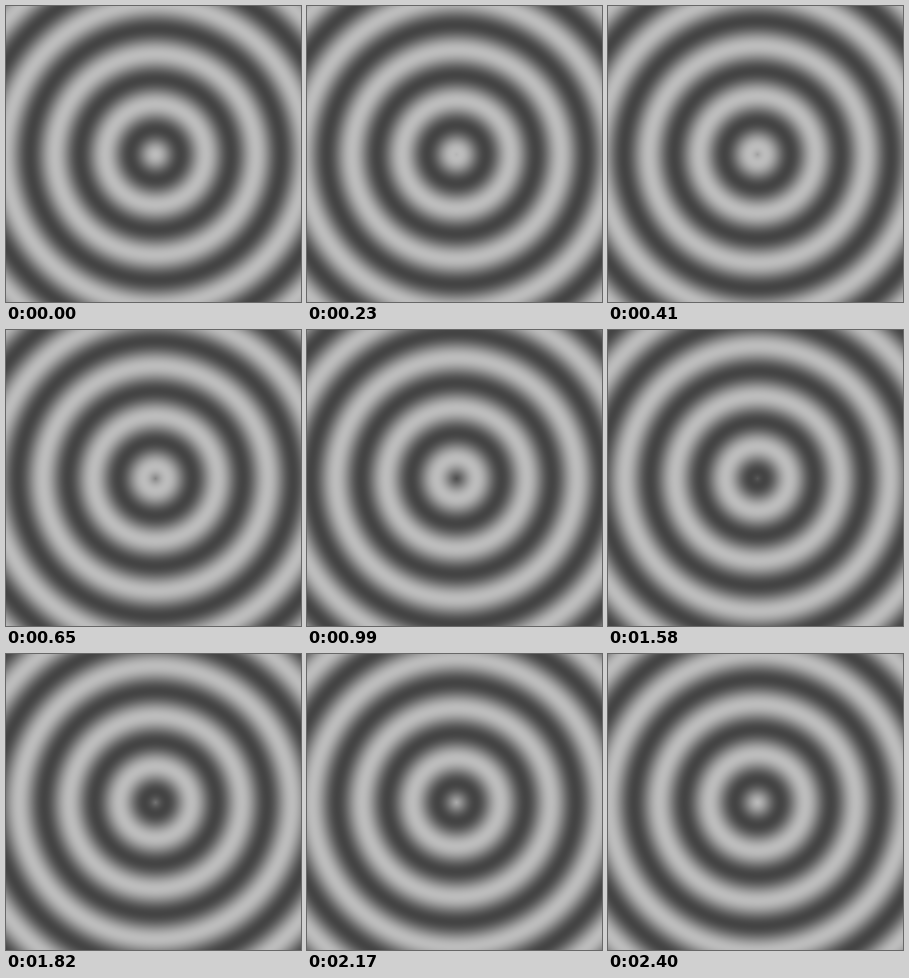
Write an HTML page with a canvas that moves like this. It is 295 px wide and 296 px high and loops after 2.46 s.

```html
<!DOCTYPE html>
<html lang="en">
<head>
<meta charset="utf-8">
<title>Ripples</title>
<style>
  html, body { margin: 0; overflow: hidden; }
  canvas { display: block; }
</style>
</head>
<body>
<canvas id="stage" width="295" height="296"></canvas>
<script>
const LOOP = 2460, TICK = 10;
const STEP_STARTS = [0, 230, 410, 650, 820, 990, 1230, 1410, 1580, 1820, 2000, 2170, 2400];
const PHASE_STEP = 0.5;            // radians the wave travels per step
const RADIUS_SCALE = 8;            // pixels per radian
const CENTER_X = 149, CENTER_Y = 148;
const MID = 128, AMPLITUDE = 60;

const canvas = document.getElementById('stage');
const ctx = canvas.getContext('2d');
const { width, height } = canvas;
const image = ctx.createImageData(width, height);
const pixels = new Uint32Array(image.data.buffer);

const distances = Float32Array.from(pixels, (_, i) =>
  Math.hypot(i % width - CENTER_X, Math.floor(i / width) - CENTER_Y) / RADIUS_SCALE);

function draw(step) {
  const phase = step * PHASE_STEP;
  for (let i = 0; i < pixels.length; i++) {
    const gray = Math.round(MID + AMPLITUDE * Math.cos(distances[i] - phase));
    pixels[i] = 0xff000000 | gray * 0x010101;
  }
  ctx.putImageData(image, 0, 0);
}

let shown = -1;
function frame() {
  const time = performance.now() % LOOP;
  const step = STEP_STARTS.filter(start => start <= time).length - 1;
  if (step !== shown) draw(shown = step);
  requestAnimationFrame(frame);
}
frame();
</script>
</body>
</html>
```
